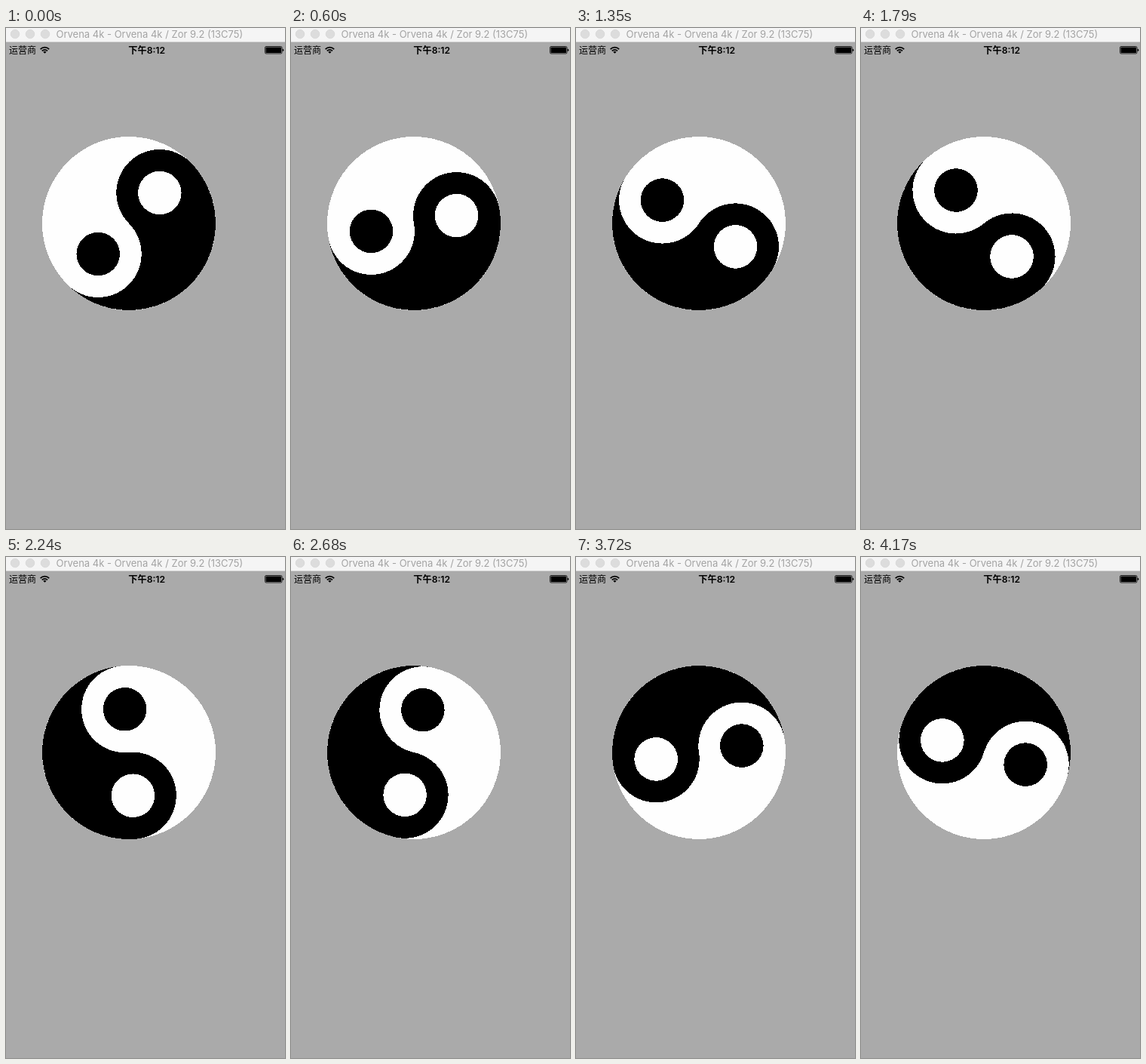
Recreate the animation shown at these times as an HTML page. Size 370 by 664 pixels, loop 4.27 s.

```html
<!DOCTYPE html>
<html lang="zh-CN">
<head>
<meta charset="utf-8">
<title>Taiji</title>
<style>
  html, body { margin: 0; width: 100%; height: 100%; overflow: hidden; background: #aaa; }
  svg { display: block; }
  text { font-family: Inter, "Noto Sans CJK SC", "Noto Sans CJK", sans-serif; }
  .title { font-size: 13px; fill: #a3a3a3; }
  .status { font-size: 12px; }
  .clock { font-size: 12.2px; font-weight: 600; text-anchor: middle; }

  /* A typed property is repainted on each tick, which keeps the edges sharp. */
  @property --angle {
    syntax: "<angle>";
    inherits: false;
    initial-value: 0deg;
  }
  .wheel {
    shape-rendering: crispEdges;
    transform: rotate(var(--angle));
    animation: turn 4270ms infinite;
  }
  @keyframes turn {
    0%      { --angle: -44.8deg; animation-timing-function: steps(9); }
    31.615% { --angle: 32.5deg; animation-timing-function: steps(6); }
    52.458% { --angle: 84.6deg; animation-timing-function: steps(5); }
    69.788% { --angle: 127.9deg; animation-timing-function: steps(5); }
    87.118% { --angle: 171.1deg; animation-timing-function: steps(3); }
    97.657%, 100% { --angle: 196.3deg; }
  }
</style>
</head>
<body>
<svg width="370" height="664" viewBox="0 0 370 664">
  <rect width="370" height="664" fill="#aaa"/>

  <!-- window bar -->
  <rect width="370" height="18.5" fill="#f5f5f5"/>
  <g fill="#dcdcdc" stroke="#d1d1d1" stroke-width=".6">
    <circle cx="12" cy="8" r="5.8"/>
    <circle cx="32" cy="8" r="5.8"/>
    <circle cx="52" cy="8" r="5.8"/>
  </g>
  <text class="title" x="66.5" y="13">Orvena 4k - Orvena 4k / Zor 9.2 (13C75)</text>

  <!-- status bar -->
  <text class="status" x="4" y="33.5">运营商</text>
  <g fill="none" stroke="#000" stroke-width="1.7">
    <path d="M45.6 28.1a8.2 8.2 0 0 1 11.6 0"/>
    <path d="M47.8 30.3a5.1 5.1 0 0 1 7.2 0"/>
  </g>
  <path d="M51.4 33.8l-2.1-2.1a3 3 0 0 1 4.2 0z"/>
  <text class="status clock" x="186.7" y="33.5">下午8:12</text>
  <rect x="343.5" y="24.5" width="22.5" height="9.5" rx="1.5" fill="none" stroke="#000" stroke-width=".8"/>
  <rect x="344.5" y="25.5" width="20.5" height="7.5" rx=".6"/>
  <path d="M366.6 27.5a1.7 1.7 0 0 1 0 3.4z"/>

  <!-- wheel -->
  <g transform="translate(163 259)">
    <g class="wheel">
      <circle r="115" fill="#fefefe"/>
      <path d="M115 0A115 115 0 0 1-115 0A57.5 57.5 0 0 0 0 0A57.5 57.5 0 0 1 115 0Z"/>
      <circle cx="57.5" r="28.75" fill="#fefefe"/>
      <circle cx="-57.5" r="28.75"/>
    </g>
  </g>
</svg>
</body>
</html>
```
